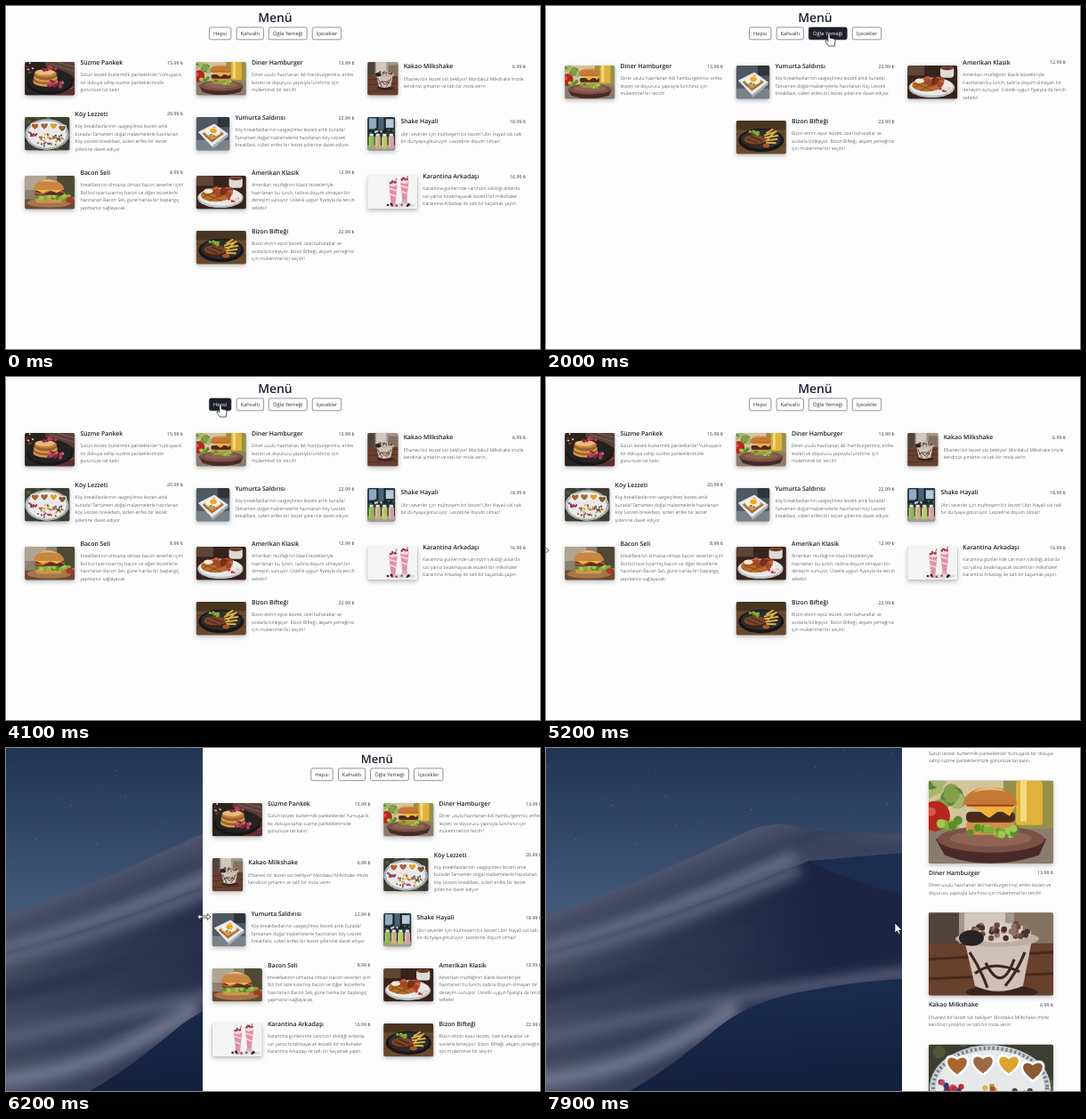
These frames come from a looping animation (600x386 px, 8 s). An HTML page:

```html
<!DOCTYPE html>
<html lang="tr">
<head>
<meta charset="utf-8">
<title>Menü</title>
<style>
  html, body { margin: 0; width: 100%; height: 100%; overflow: hidden; background: #fdfdfe; }
  #stage { display: block; width: 600px; height: 386px; }
  text { font-family: "Open Sans", "Noto Sans", "DejaVu Sans", sans-serif; text-rendering: geometricPrecision; }
  .title { font-weight: 600; fill: #1f2230; text-anchor: middle; }
  .btn rect { fill: #fdfdfe; stroke: #4a4d55; stroke-width: .6; }
  .btn text { font-size: 5.8px; fill: #33363d; text-anchor: middle; }
  .btn.on rect { fill: #1c1f28; stroke: #1c1f28; }
  .btn.on text { fill: #fff; }
  .name { font-size: 6.85px; font-weight: 600; fill: #1b1d24; }
  .price { font-size: 5.3px; fill: #33363d; text-anchor: end; }
  .desc { font-size: 5.28px; font-weight: 300; fill: #24262c; }
  .shade { fill: #999; filter: drop-shadow(0 2.2px 2.4px rgba(0,0,0,.25)); }
  .cursor path { fill: #fff; stroke: #111; stroke-width: .7; stroke-linejoin: round; }
</style>
</head>
<body>
<svg id="stage" viewBox="0 0 600 386">
  <defs>
    <linearGradient id="sky" x2="0" y2="1"><stop stop-color="#213453"/><stop offset=".45" stop-color="#425878"/></linearGradient>
    <linearGradient id="back" gradientUnits="userSpaceOnUse" x1="150" y1="126" x2="180" y2="196">
      <stop stop-color="#4f566e"/><stop offset=".45" stop-color="#363e57"/><stop offset="1" stop-color="#4a516a"/></linearGradient>
    <linearGradient id="mid" gradientUnits="userSpaceOnUse" x1="0" y1="250" x2="380" y2="190">
      <stop stop-color="#41485f"/><stop offset=".5" stop-color="#2a324c"/><stop offset=".8" stop-color="#1b2440"/></linearGradient>
    <linearGradient id="front" x2=".3" y2="1"><stop stop-color="#1b2e50"/><stop offset="1" stop-color="#13203c"/></linearGradient>
    <filter id="soft" x="-20%" y="-50%" width="140%" height="200%"><feGaussianBlur stdDeviation="7"/></filter>
    <filter id="lens" x="0" y="0" width="1" height="1">
      <feGaussianBlur stdDeviation=".5" result="blur"/>
      <feMerge><feMergeNode in="SourceGraphic"/><feMergeNode in="blur"/></feMerge>
    </filter>
  </defs>
  <g id="desktop"></g>
  <g id="page">
    <rect id="paper" width="640" height="386" fill="#fdfdfe"/>
    <g id="content">
      <text class="title" id="title" y="17.8">Menü</text>
      <g id="buttons"></g>
      <g id="cards"></g>
    </g>
  </g>
  <g class="cursor" id="cursor"><path id="cursorPath"/></g>
</svg>
<script>
const $ = id => document.getElementById(id);
const ell = (x, y, rx, ry, fill) => `<ellipse cx="${x}" cy="${y}" rx="${rx}" ry="${ry}" fill="${fill}"/>`;
const box = (x, y, w, h, fill, r = 0) => `<rect x="${x}" y="${y}" width="${w}" height="${h}" rx="${r}" fill="${fill}"/>`;
const shape = (d, fill) => `<path d="${d}" fill="${fill}"/>`;
const line = (d, color, width) => `<path d="${d}" fill="none" stroke="${color}" stroke-width="${width}"/>`;
const random = seed => () => (seed = seed * 16807 % 2147483647) / 2147483647;

function dots(n, seed, x, y, rx, ry, size, colors) {
  const rnd = random(seed);
  return Array.from({ length: n }, (_, i) => {
    const a = rnd() * 7, d = Math.sqrt(rnd());
    return ell(x + Math.cos(a) * rx * d, y + Math.sin(a) * ry * d, size, size, colors[i % colors.length]);
  }).join('');
}

const berry = ['#b03a56', '#8a2440', '#c9607a'];
const green = ['#7fae35', '#a3c750', '#5d8c2a'];

// Each picture is 140 units wide
const art = {
  pancake: () => box(0, 0, 140, 94, '#2c221e') + shape('M58 0H140V46Q118 22 58 12Z', '#5a4038') +
    shape('M98 72L140 52V94H84Z', '#5c2f2e') + line('M70 5L140 26M90 0L140 14M104 84L140 70', '#83695c', 2) +
    ell(70, 58, 65, 33, '#131317') + ell(70, 54, 62, 30, '#202024') +
    [55, 49, 43, 37].map((y, i) => ell(58, y, 35 - i, 14, i % 2 ? '#9c5f2b' : '#d39a52')).join('') +
    ell(58, 32, 31, 11, '#c08440') + ell(56, 29, 27, 8, '#e5bd7c') +
    dots(10, 7, 67, 19, 20, 6, 4.5, berry) + dots(14, 23, 84, 63, 25, 10, 5, berry) + dots(9, 4, 10, 16, 14, 16, 2.5, ['#8f4a40', '#d9d2c8', '#6d2c28']),
  burger: () => box(0, 0, 140, 94, '#d3c49b') + box(84, 0, 56, 56, '#97904a') + dots(14, 18, 14, 16, 26, 20, 9, ['#83a04a', '#a5b86a', '#60803a']) +
    box(0, 54, 140, 40, '#8a7b6c') + box(98, 0, 30, 50, '#e0b23a', 4) + box(103, 0, 7, 46, '#f3da83') +
    ell(7, 40, 17, 17, '#b5251f') + ell(2, 35, 6, 5, '#d9574a') + dots(9, 9, 24, 50, 12, 8, 5, green) +
    shape('M8 66Q70 36 132 66L124 84Q68 102 18 84Z', '#4a2b26') + ell(70, 66, 60, 15, '#7b5145') + ell(70, 65, 46, 9, '#916455') +
    box(42, 44, 54, 17, '#cf9149', 6) + dots(24, 12, 70, 57, 32, 6, 4, green) +
    box(42, 35, 55, 12, '#4b2a1e', 5) + shape('M41 28H98L91 40 80 33 68 42 55 33Z', '#f0b138') + box(42, 25, 54, 4, '#a33a31', 2) +
    shape('M39 27C38 2 98 0 99 27Z', '#c47a35') + shape('M50 13Q68 2 86 12Q68 9 50 13Z', '#e8b878'),
  kakao: () => box(0, 0, 140, 152, '#a3978a') + box(0, 0, 34, 68, '#51433b') + box(40, 0, 46, 66, '#d0c8bc') + box(96, 14, 44, 56, '#84725f') +
    box(0, 64, 140, 88, '#67402e') + line('M0 82L140 74M0 104L140 98M0 134L140 128', '#452a1f', 3) +
    ell(82, 119, 40, 8, '#3b241b') + shape('M40 60H116L106 112Q77 124 52 112Z', '#cfc1b6') +
    line('M46 74Q58 92 66 114M64 86Q82 122 96 82M108 74Q98 98 86 112M52 98Q72 82 102 96', '#40271f', 3.2) +
    ell(77, 59, 47, 9, '#bfaea3') + ell(79, 52, 36, 11, '#dacdc4') + dots(32, 17, 82, 50, 32, 10, 3.2, ['#6b4a3f', '#937265', '#4a3029']) + ell(48, 58, 14, 9, '#262126'),
  platter: () => box(0, 0, 140, 104, '#3c3d33') + dots(26, 5, 70, 52, 86, 64, 7, ['#4d5a35', '#2a2a26', '#6b6253']) +
    ell(69, 54, 68, 48, '#c6ccd1') + ell(69, 54, 61, 42, '#e6e8ea') +
    `<ellipse cx="69" cy="54" rx="64" ry="44.5" fill="none" stroke="#6f777d" stroke-width="4" stroke-dasharray="2 3"/>` +
    [[32, 28, '#a9652e'], [61, 27, '#9c6a46'], [90, 27, '#dda32d'], [117, 34, '#8b5a35']].map(([x, y, c]) =>
      `<g transform="translate(${x} ${y})">` + shape('M0 14C-24-2-11-17 0-8C11-17 24-2 0 14Z', '#fff') + shape('M0 11C-19-2-9-13 0-5C9-13 19-2 0 11Z', c) + '</g>').join('') +
    dots(13, 6, 24, 53, 14, 11, 3.2, ['#b5303c', '#2e3a68', '#d04855']) + dots(20, 8, 66, 62, 28, 15, 3, ['#d9b23f', '#c3402f', '#94aa45']) +
    dots(16, 3, 104, 66, 18, 12, 3, ['#79543c', '#d59836', '#4c405a']) + dots(12, 31, 67, 84, 32, 7, 3, ['#a06c3d', '#8f3f50']),
  egg: () => box(0, 0, 140, 139, '#4f5963') + box(0, 96, 140, 43, '#79818a') + box(90, 0, 50, 42, '#2f353b') +
    shape('M8 62L76 28 134 70 66 124Z', '#e6e8e9') + shape('M66 124L134 70V80L68 134Z', '#aab0b5') +
    shape('M26 70L76 40 116 70 66 106Z', '#a86a32') + shape('M32 66L76 42 108 67 66 96Z', '#d39b52') +
    ell(70, 62, 32, 18, '#f5f1e8') + ell(72, 57, 14, 11, '#f2a81f') + dots(10, 2, 60, 76, 26, 12, 2.4, ['#7b5528', '#5a7a33']),
  shake: () => box(0, 0, 140, 168, '#27343c') + box(8, 6, 38, 54, '#90aac4') + box(56, 0, 26, 66, '#4c6378') + box(92, 10, 40, 44, '#b6c8da') +
    line('M0 72H140M50 0V90M88 0V90', '#15201f', 6) + dots(14, 14, 70, 70, 66, 18, 6, ['#466045', '#1d2928', '#c2ccd0']) + box(0, 142, 140, 26, '#a59a8c') +
    [['#8eb552', 6], ['#c9ad86', 38], ['#b9c862', 72], ['#d3a3a0', 106]].map(([c, x]) => box(x + 5, 84, 18, 16, '#dfe4e2', 3) + box(x, 96, 28, 62, c, 6) + box(x + 4, 102, 4, 48, '#ffffff66', 2)).join(''),
  bacon: () => box(0, 0, 140, 94, '#8b8171') + box(0, 0, 60, 40, '#b0a592') + box(90, 0, 50, 60, '#4e4a35') + shape('M0 66H140V94H0Z', '#6e4931') +
    ell(68, 76, 62, 13, '#a5764d') + box(30, 58, 74, 18, '#cf9648', 8) + dots(26, 22, 74, 58, 52, 8, 6, green) +
    box(28, 42, 82, 12, '#5e2c20', 5) + line('M26 45Q44 56 62 45T112 48', '#b3523c', 5) + shape('M30 39H106L90 48 70 41 50 49Z', '#e7b546') +
    shape('M25 40C24 2 108 2 110 40Z', '#c98640') + shape('M40 18Q66 3 92 18Q66 13 40 18Z', '#ebc387') + ell(126, 68, 10, 8, '#b23126'),
  waffle: () => box(0, 0, 140, 94, '#38231c') + box(0, 0, 48, 28, '#5e4436') + box(92, 4, 38, 30, '#dfdad2', 9) + ell(111, 8, 17, 5, '#6d3724') +
    ell(68, 62, 64, 28, '#b9c0c7') + ell(68, 59, 60, 25, '#e9e9e8') + ell(55, 55, 42, 18, '#b56f2f') +
    line('M20 50L70 70M34 42L86 64M18 62L62 38M36 70L90 44', '#8b4c1e', 2.5) + dots(16, 10, 73, 46, 30, 15, 8, ['#a14728', '#c2643a', '#77301e']) +
    dots(8, 21, 104, 65, 14, 8, 4, ['#c5303a', '#e7d5c6']) + ell(34, 43, 13, 7, '#f4e7cd'),
  pink: () => box(0, 0, 140, 94, '#f4f4f5') + ell(95, 83, 40, 6, '#dcdce0') +
    [[72, 22], [104, 14]].map(([x, y]) => shape(`M${x - 12} ${y}H${x + 12}L${x + 6} ${y + 56}H${x - 6}Z`, '#e58fa6') +
      line(`M${x - 10} ${y + 14}L${x + 9} ${y + 20}M${x - 8} ${y + 30}L${x + 7} ${y + 36}`, '#f6dbe2', 4) + box(x - 8, y + 56, 16, 8, '#c8b9c1', 2) +
      ell(x, y, 13, 8, '#eee3e5') + dots(6, x, x, y - 4, 9, 5, 3, ['#6c3240', '#b93e59']) + line(`M${x + 4} ${y}L${x + 10} ${y - 16}`, '#cf4965', 2.5)).join('') +
    dots(10, 44, 84, 82, 34, 5, 3.2, ['#55222d', '#b73a4d', '#33262c']),
  steak: () => box(0, 0, 140, 94, '#6a4a2c') + box(0, 0, 140, 26, '#493521') + line('M0 38H140M0 70H140', '#553a22', 3) +
    ell(70, 55, 64, 33, '#18191b') + ell(70, 52, 56, 27, '#2d2d2e') + ell(54, 57, 33, 15, '#3f2317') + ell(53, 53, 31, 13, '#794529') +
    line('M30 51L60 63M42 44L74 58', '#4a2818', 3) + line('M78 42L114 30M80 48L118 42M82 56L116 52M84 62L112 63M84 36L104 24M88 52L108 32', '#deb044', 5) +
    dots(10, 13, 46, 36, 18, 6, 4, green) + ell(84, 70, 10, 6, '#a9552b'),
};

// "/" breaks a line beside the picture, "|" a line below it
const dishes = [
  ['Süzme Pankek', 15.99, 'K', 'pancake', 93.3, 'Sütün lezzeti buttermilk pankeklerde! Yumuşacık/bir dokuya|sahip süzme pankeklerimizle/gününüze tat katın.'],
  ['Diner Hamburger', 13.99, 'O', 'burger', 93.3, 'Diner usulü hazırlanan ikili hamburgerimiz, enfes/lezzeti ve|doyurucu yapısıyla lunchınız için/mükemmel bir tercih!'],
  ['Kakao Milkshake', 6.99, 'I', 'kakao', 152, 'Efsanevi bir lezzet sizi bekliyor! Mordakul Milkshake imizle/|kendinizi şımartın ve tatlı bir mola verin.'],
  ['Köy Lezzeti', 20.99, 'K', 'platter', 104, 'Köy breakfastlarının vazgeçilmez lezzeti artık/burada! Tamamen|doğal malzemelerle hazırlanan/Köy Lezzeti breakfastı, sizleri enfes bir lezzet/şölenine davet ediyor.'],
  ['Yumurta Saldırısı', 22.99, 'O', 'egg', 139, 'Köy breakfastlarının vazgeçilmez lezzeti artık burada!/Tamamen doğal malzemelerle hazırlanan Köy Lezzeti/breakfastı, sizleri enfes bir lezzet şölenine davet ediyor.'],
  ['Shake Hayali', 18.99, 'I', 'shake', 168, 'Ubri severler için muhteşem bir lezzet! Ubri Hayali sizi tatlı/bir dünyaya götürüyor. Lezzetine doyum olmaz!'],
  ['Bacon Seli', 8.99, 'K', 'bacon', 93.3, 'breakfastının olmazsa olmazı bacon severleri için!/Bol bol taze kızarmış bacon ve diğer lezzetlerle/hazırlanan Bacon Seli, güne harika bir başlangıç/yapmanızı sağlayacak.'],
  ['Amerikan Klasik', 12.99, 'O', 'waffle', 93.3, 'Amerikan mutfağının klasik lezzetleriyle/hazırlanan bu lunch, tadına doyum olmayan bir/deneyim sunuyor. Üstelik uygun fiyatıyla da tercih/sebebi!'],
  ['Karantina Arkadaşı', 16.99, 'I', 'pink', 93.3, 'Karantina günlerinde canınızın sıkıldığı anlarda/sizi yalnız bırakmayacak lezzetli bir milkshake!/Karantina Arkadaşı ile tatlı bir kaçamak yapın.'],
  ['Bizon Bifteği', 22.99, 'O', 'steak', 93.3, 'Bizon etinin eşsiz lezzeti, özel baharatlar ve/soslarla birleşiyor. Bizon Bifteği, akşam yemeğiniz/için mükemmel bir seçim!'],
].map(([name, price, kind, pic, tall, text], id) => ({ id, name, price, kind, pic, tall, text }));

const split = (text, mark, other) => text.replaceAll(other + mark, mark).replaceAll(mark + other, mark).replaceAll(other, ' ').split(mark);
const besideLines = d => split(d.text, '/', '|');
const belowLines = d => split(d.text, '|', '/');

const picture = (d, x, y, w, h) => `<g transform="translate(${x} ${y})">
  <rect class="shade" width="${w}" height="${h}" rx="2"/>
  <clipPath id="clip${d.id}"><rect width="${w}" height="${h}" rx="2"/></clipPath>
  <g clip-path="url(#clip${d.id})"><g filter="url(#lens)"><svg width="${w}" height="${h}" viewBox="0 0 140 ${d.tall}" preserveAspectRatio="xMidYMid slice">${art[d.pic]()}</svg></g></g></g>`;

const words = (d, lines, x, right, y) =>
  `<text class="name" x="${x}" y="${y}">${d.name}</text><text class="price" x="${right}" y="${y - .4}">${d.price} ₺</text>` +
  lines.map((s, i) => `<text class="desc" x="${x}" y="${y + 13.3 + 8.45 * i}">${s}</text>`).join('');

function stackedCards(list) {
  return list.map((d, i) => {
    const y = 58.7 + 148.5 * i;
    return picture(d, -70, y, 140, 93.3) + words(d, belowLines(d), -70, 70, y + 106.2);
  }).join('');
}

function gridCards(list, cols) {
  let out = '', top = 52.7;
  for (let i = 0; i < list.length; i += cols) {
    const row = list.slice(i, i + cols);
    const height = row.some(d => besideLines(d).length > 3) ? 66 : 58;
    const mid = top + height / 2;
    row.forEach((d, j) => {
      const x = (j - row.length / 2) * 192.5 + 7.5;
      const w = 37.4 * 140 / d.tall, lines = besideLines(d);
      out += picture(d, x, mid - 18.7, w, 37.4) + words(d, lines, x + w + 6.1, x + 177.8, mid - 15.6 - (lines.length - 3) * 4.25);
    });
    top += height;
  }
  return out;
}

const buttons = [['Hepsi', -74, 24.5], ['Kahvaltı', -43.3, 30.3], ['Öğle Yemeği', -7.2, 43], ['İçecekler', 41.8, 32.5]];
$('buttons').innerHTML = buttons.map(([label, x, w]) =>
  `<g class="btn"><rect x="${x}" y="24" width="${w}" height="13.8" rx="2"/><text x="${x + w / 2}" y="33">${label}</text></g>`).join('');

function dune(id, outline, fill, shading) {
  return `<clipPath id="${id}Edge"><path d="${outline}"/></clipPath>` + shape(outline, fill) +
    `<g clip-path="url(#${id}Edge)"><g filter="url(#soft)">${shading}</g></g>`;
}

function drawDesktop() {
  const rnd = random(77);
  const stars = Array.from({ length: 60 }, () => `<circle cx="${rnd() * 400}" cy="${rnd() * 150}" r="${.3 + rnd() * .3}" fill="#c8d6ea" opacity="${.15 + rnd() * .4}"/>`).join('');
  $('desktop').innerHTML = box(0, 0, 600, 386, 'url(#sky)') + stars +
    dune('back', 'M0 188C70 165 150 130 215 99C245 84 262 83 285 90C320 97 360 95 600 103V386H0Z', 'url(#back)',
      line('M-20 230C90 200 180 166 280 122', '#6a7088', 14) + shape('M300 108L600 90V140L300 126Z', '#39425c')) +
    dune('mid', 'M0 232C90 208 190 170 295 127C330 125 365 120 600 104V386H0Z', 'url(#mid)',
      line('M-20 242C90 216 190 176 285 136', '#646a82', 13) + line('M-20 282C80 262 160 240 230 210', '#2b334d', 16) +
      line('M-20 330C100 306 220 274 420 252', '#595f78', 14) + line('M-20 350C60 338 130 322 190 300', '#394058', 8) +
      line('M-20 376C80 366 140 338 215 294', '#70768e', 18)) +
    shape('M295 127C330 125 365 120 600 104V220C440 180 350 155 295 127Z', '#1b2d4f') +
    shape('M94 386C130 366 165 338 195 313C222 293 250 281 290 274C330 266 365 262 400 260H600V386Z', 'url(#front)');
}

const clamp = v => Math.max(0, Math.min(1, v));
const smooth = v => (v = clamp(v)) * v * (3 - 2 * v);

function along(keys, t, ease = clamp) {
  const n = keys.findIndex(k => k[0] > t);
  if (n === 0) return keys[0].slice(1);
  if (n < 0) return keys.at(-1).slice(1);
  const [a, b] = [keys[n - 1], keys[n]], f = ease((t - a[0]) / (b[0] - a[0]));
  return a.slice(1).map((v, i) => v + (b[i + 1] - v) * f);
}

const edgeKeys = [[5450, 0], [5800, 70], [6200, 221], [6300, 325], [6700, 354], [6800, 376], [6910, 400]];
const pointerKeys = [[150, 300, 120], [450, 268, 29], [1200, 268, 29], [1450, 318, 31], [2300, 318, 31], [2550, 373, 29],
  [3400, 373, 29], [3800, 241, 31], [4150, 241, 31], [4500, 14, 170], [4700, 0, 195]];
const gripKeys = [[5450, 195], [6200, 190], [6800, 203]];
const filters = [[0, ''], [500, 'K'], [1600, 'O'], [2650, 'I'], [4000, '']];
const cursors = {
  arrow: 'M0 0V11.2L2.6 8.8 4.4 12.6 6.2 11.8 4.5 8.1H8Z',
  hand: 'M-1.2.8C-1.2-.6 1-.6 1 .8V5L5 5.8Q7.2 6.2 7 8.4L6.2 14H-.6L-4 9.2Q-4.4 7.4-2.6 7.6L-1.2 9Z',
  resize: 'M-7.5 0L-3.8-3.4V-1H3.8V-3.4L7.5 0 3.8 3.4V1H-3.8V3.4Z',
};

let shown;
function render(t) {
  const [edge] = along(edgeKeys, t);
  const width = 600 - along(edgeKeys, t - 27)[0];   // the page trails the dragged edge
  const center = edge + width * .506 - 1.2;
  const size = Math.min(13.9, 10.9 + .013 * (width - 230));
  const lift = Math.max(0, (13.9 - size) * 1.2);
  const scroll = 166.5 * smooth((t - 7100) / 750);

  const kind = filters.findLast(f => f[0] <= t)[1];
  const cols = width > 570 ? 3 : width > 340 ? 2 : 1;
  if (shown !== kind + cols) {
    shown = kind + cols;
    const list = dishes.filter(d => !kind || d.kind === kind);
    $('cards').innerHTML = cols > 1 ? gridCards(list, cols) : stackedCards(list);
  }
  $('paper').setAttribute('x', edge);
  $('content').setAttribute('transform', `translate(${center} ${-lift - scroll})`);
  $('title').style.fontSize = size + 'px';

  let [x, y] = along(pointerKeys, t, smooth), look = 'arrow', hovered = -1;
  if (t >= 7000) {
    [x, y] = along([[7000, 398, 203], [7150, 392, 197]], t, smooth);
  } else if (t >= 4680) {
    look = 'resize';
    x = edge - 4.5 + Math.min(edge, 6);
    y = along(gripKeys, t)[0];
  } else {
    hovered = buttons.findIndex(([, bx, w]) => y > 24 && y < 38 && x > center + bx && x < center + bx + w);
    if (hovered >= 0) look = 'hand';
  }
  [...$('buttons').children].forEach((b, i) => b.classList.toggle('on', t >= 150 && i === hovered));
  $('cursorPath').setAttribute('d', cursors[look]);
  $('cursor').setAttribute('transform', `translate(${x} ${y})`);
  $('cursor').setAttribute('visibility', t < 150 ? 'hidden' : 'visible');
}

drawDesktop();
render(0);
let start;
requestAnimationFrame(function tick(now) {
  start ??= now;
  render((now - start) % 8000);
  requestAnimationFrame(tick);
});
</script>
</body>
</html>
```
